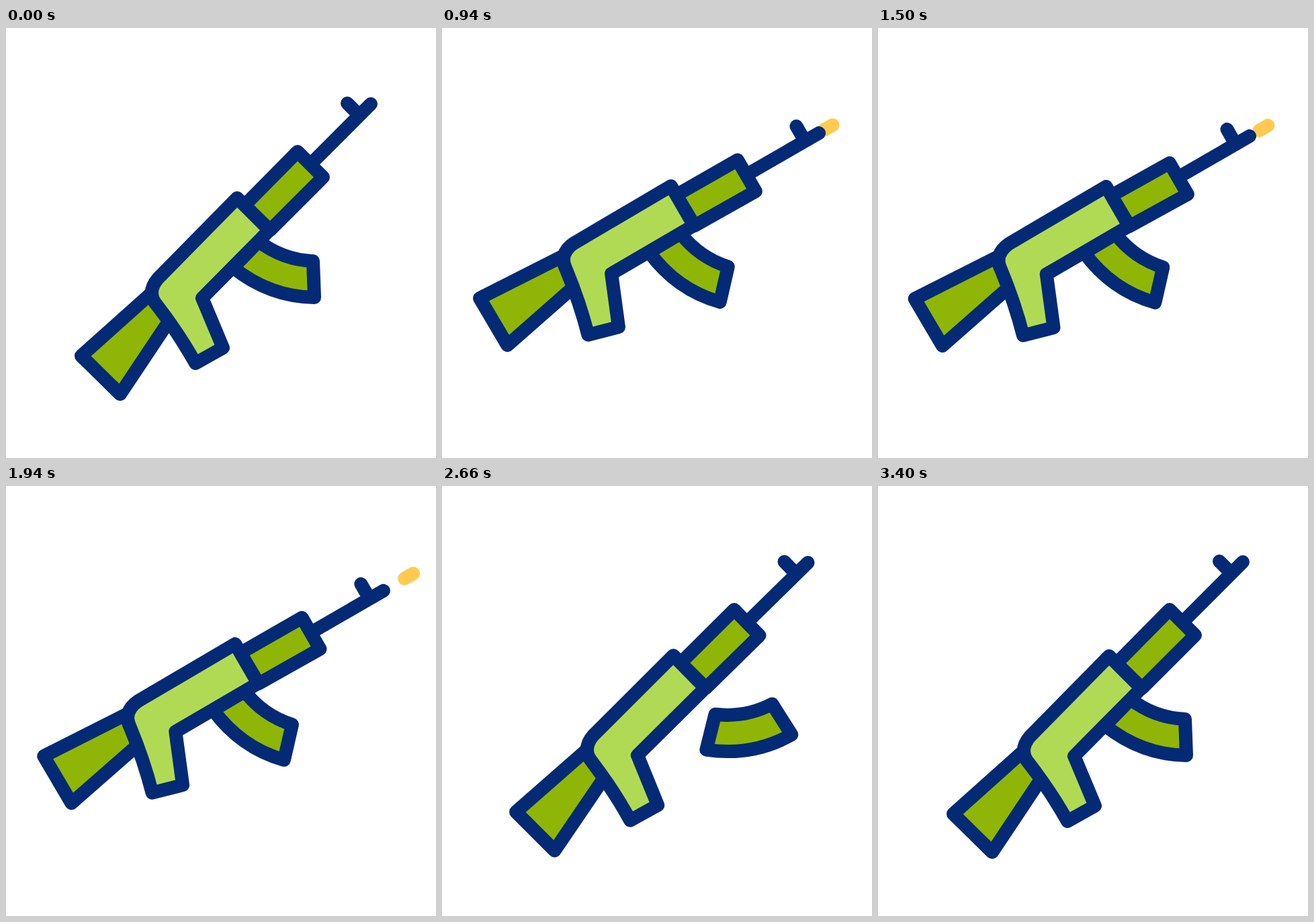
These frames come from a looping animation (640x640 px, 3.62 s). An HTML page:

```html
<!DOCTYPE html>
<html lang="en">
<head>
<meta charset="utf-8">
<title>Icon loop</title>
<style>
  html, body { margin: 0; width: 100%; height: 100%; overflow: hidden; background: #fff; }
  svg { display: block; width: 100vw; height: 100vh; }
  .ink { stroke: #042a75; stroke-width: 20; stroke-linecap: round; stroke-linejoin: round; fill: none; }
  .dark { fill: #8fb607; }
  .light { fill: #b1da54; }
  #bullet { stroke: #ffca4f; stroke-width: 20; stroke-linecap: round; }
</style>
</head>
<body>
<svg viewBox="0 0 640 640">
  <g id="gun">
    <line id="bullet"/>
    <path id="barrel" class="ink" d="M543 113L438 218M508 112L525 129"/>
    <path id="guard" class="ink dark"/>
    <path class="ink dark" d="M112 488L170 545L246 431L220 391.4Z"/>
    <path id="mag" class="ink dark" d="M376 317.5Q412 345 457 347L459 401Q392 400 338 356.5Z"/>
    <path class="ink light" d="M344 253L392 301L292 402L323 476L282 499Q258 456 225 413C214 401 214 387 226 373Z"/>
  </g>
</svg>
<script>
const LOOP = 3620;
const SHOTS = { start: 720, end: 2160, period: 180 };
const TIP = [543, 113];

const el = id => document.getElementById(id);
const gun = el('gun'), bullet = el('bullet'), barrel = el('barrel'), guard = el('guard'), mag = el('mag');

const cubic = p => p < .5 ? 4 * p ** 3 : 1 - 4 * (1 - p) ** 3;
const sine = p => (1 - Math.cos(Math.PI * p)) / 2;
const easeIn = p => p * p;
const easeOut = p => 1 - (1 - p) ** 2;
const linear = p => p;

// time, [angle, x, y], easing towards this step
const gunSteps = [
  [220, [0, 0, 0]],
  [580, [17.2, -8.1, -32.7], cubic],
  [720, [15, -17.7, -27.4], sine],
  [2240, [15, -17.7, -27.4], linear],
  [2380, [17.1, -11, -32], sine],
  [2730, [0, 0, 0], cubic]
];
const magSteps = [
  [2450, [0, 0, 0]],
  [2560, [0, 22, 22], easeIn],
  [2660, [-30.7, 46, 1], linear],
  [2920, [-35, 57.5, -1.5], easeOut],
  [3220, [0, 22, 22], sine],
  [3400, [0, 0, 0], sine]
];

function pose(steps, t) {
  const i = steps.findIndex(s => s[0] > t);
  if (i === 0) return steps[0][1];
  if (i < 0) return steps[steps.length - 1][1];
  const [t0, a] = steps[i - 1], [t1, b, ease] = steps[i];
  const p = ease((t - t0) / (t1 - t0));
  return a.map((v, k) => v + (b[k] - v) * p);
}

// shift along the barrel axis, positive towards the muzzle
const along = n => [n * Math.SQRT1_2, -n * Math.SQRT1_2];
const slide = n => `translate(${along(n)})`;

function setBullet(phase) {
  const grow = Math.min(1, phase / 40) * 14;
  const fly = Math.max(0, phase - 60) * .35;
  const [x1, y1] = along(fly - 1), [x2, y2] = along(fly + grow);
  const ends = { x1: TIP[0] + x1, y1: TIP[1] + y1, x2: TIP[0] + x2, y2: TIP[1] + y2 };
  for (const k in ends) bullet.setAttribute(k, ends[k]);
}

// the front edge is pushed in while the rear edge stays put
function setGuard(kick) {
  const x = -10.2 * kick, y = 14 * kick;
  guard.setAttribute('d', `M${434 + x} ${184 + y}L${472 + x} ${222 + y}L393 301L355 264Z`);
}

function draw(t) {
  const firing = t >= SHOTS.start && t < SHOTS.end;
  const phase = firing ? (t - SHOTS.start) % SHOTS.period : 0;
  const kick = sine(2 * phase / SHOTS.period);

  const [a, x, y] = pose(gunSteps, t);
  gun.setAttribute('transform', `translate(${x} ${y}) rotate(${a} 320 320) ${slide(-5 * kick)}`);
  barrel.setAttribute('transform', slide(-22.5 * kick));
  setGuard(kick);

  const [ma, mx, my] = pose(magSteps, t);
  mag.setAttribute('transform', `translate(${mx} ${my}) rotate(${ma} 407.5 355.5)`);

  bullet.style.display = phase > 0 ? '' : 'none';
  setBullet(phase);
}

const begin = performance.now();
function tick() {
  draw((performance.now() - begin) % LOOP);
  requestAnimationFrame(tick);
}
tick();
</script>
</body>
</html>
```
